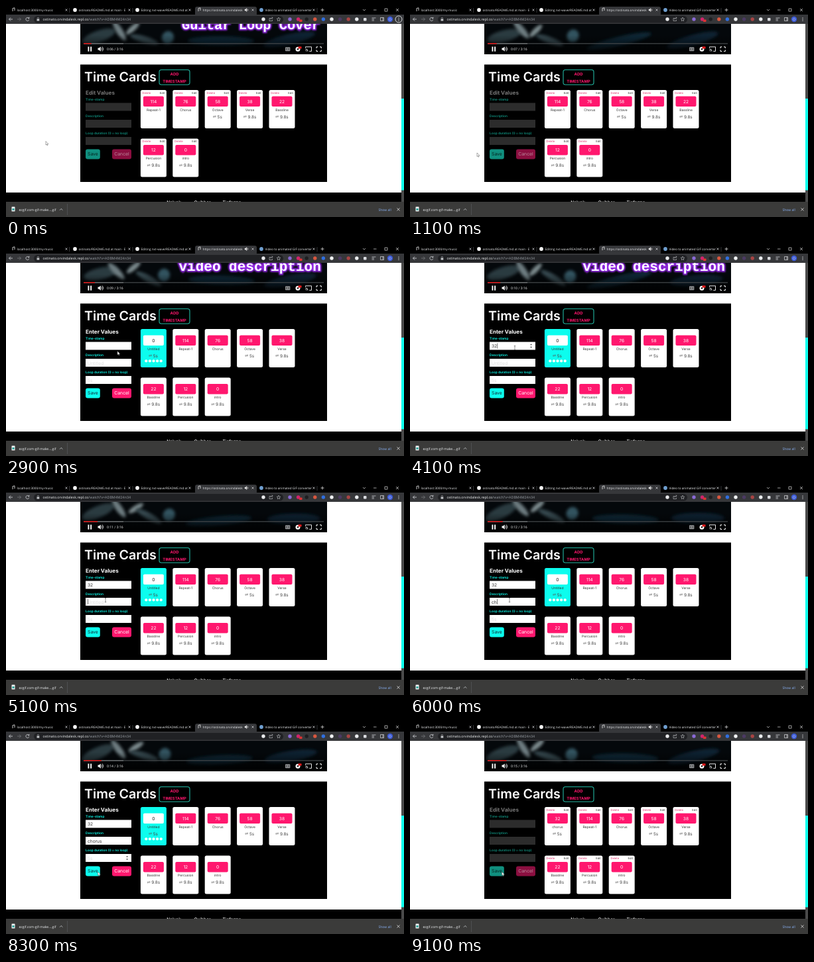
An HTML page that plays this animation: 600x319 px, repeating every 9.2 s.

```html
<!DOCTYPE html>
<html lang="en">
<head>
<meta charset="utf-8">
<title>Time Cards</title>
<style>
html, body { margin: 0; width: 100%; height: 100%; overflow: hidden; background: #fff; }
svg { display: block; width: 100vw; height: 100vh; }
text { font-family: Inter, "Open Sans", sans-serif; text-rendering: geometricPrecision; white-space: pre; }
.ui text { font-family: "Open Sans", "Noto Sans", sans-serif; }
.caption text { font-family: "Liberation Mono", monospace; font-weight: 700; }
</style>
</head>
<body>
<svg id="stage" viewBox="0 0 600 319" preserveAspectRatio="none"></svg>
<script>
const LOOP = 9200, STEP = 100;
const ADD = 2300, SAVE = 8900;
const CYAN = '#0cfdee', PINK = '#ff176e';
const stage = document.getElementById('stage');

function el(parent, tag, attrs = {}, text) {
  const node = document.createElementNS('http://www.w3.org/2000/svg', tag);
  for (const key in attrs) node.setAttribute(key, attrs[key]);
  if (text !== undefined) node.textContent = text;
  parent.append(node);
  return node;
}
const group = (p, attrs) => el(p, 'g', attrs);
const box = (p, x, y, width, height, fill, rx = 0, more = {}) =>
  el(p, 'rect', { x, y, width, height, fill, rx, ...more });
const dot = (p, cx, cy, r, fill) => el(p, 'circle', { cx, cy, r, fill });
const line = (p, d, stroke, w = 0.8, fill = 'none') =>
  el(p, 'path', { d, stroke, 'stroke-width': w, fill });
const label = (p, x, y, size, text, fill, more = {}) =>
  el(p, 'text', { x, y, 'font-size': size, fill, ...more }, text);
const MID = { 'text-anchor': 'middle' }, END = { 'text-anchor': 'end' };
const SEMI = { 'font-weight': 600 }, BOLD = { 'font-weight': 700 };
const show = (node, on) => { node.style.display = on ? '' : 'none'; };
const cross = (p, x, y, r, color) =>
  line(p, `M${x - r} ${y - r}L${x + r} ${y + r}M${x + r} ${y - r}L${x - r} ${y + r}`, color, 0.7);

// ---------- browser frame ----------
function drawBrowser() {
  const ui = group(stage, { class: 'ui' });
  box(ui, 0, 0, 600, 14, '#000');
  box(ui, 285, 1, 93, 14, '#36373a', 3);
  box(ui, 0, 13, 600, 14, '#36373a');

  const tabs = [
    [11, 'localhost:3000/my-music', 91, '#d8d8d8'],
    [104, 'ostinato/README.md at main · E', 186, '#f2f2f2'],
    [198, 'Editing nxt-wave/README.md at', 277, '#f2f2f2'],
    [291, 'https://ostinato.orvindalesk', 372, '#d8d8d8'],
    [385, 'Video to animated GIF converter', 464, '#6f9fd0'],
  ];
  tabs.forEach(([x, name, close, color], i) => {
    const clip = el(ui, 'clipPath', { id: 'tab' + i });
    box(clip, x, 0, i === 3 ? 66 : close - x - 3, 14, '#000');
    if (i % 3) dot(ui, x, 6, 2.9, color);
    else line(ui, `M${x - 1} 8V3.5l3 -.7V7`, color, 0.9);
    label(ui, x + 5.5, 7.8, 4.7, name, '#eceef0', { 'clip-path': `url(#tab${i})` });
    cross(ui, close, 6, 1.5, '#dadce0');
  });
  line(ui, 'M360 5h1.3l1.7 -1.5v5l-1.7 -1.5h-1.3zM364.3 4.5q1.3 1.5 0 3', '#ddd', 0.5, '#ddd');
  line(ui, 'M95.5 3v7M191 3v7M469 3v7', '#56585c', 0.6);
  line(ui, 'M474.5 6h5M477 3.5v5', '#ddd', 0.8);
  line(ui, 'M538 5l2 2 2 -2M554 6h4.5M571 4h4v4h-4z', '#ddd', 0.7);
  cross(ui, 590, 6, 2, '#ddd');

  line(ui, 'M10 20H4.5M7 17.5L4.5 20 7 22.5', '#dadce0');
  line(ui, 'M17 20h5.5M20 17.5l2.5 2.5 -2.5 2.5', '#77797d');
  line(ui, 'M34.3 18.3a2.5 2.5 0 1 0 .5 2.4M34.9 16.8v2h-2', '#dadce0');
  box(ui, 42, 15, 376, 10.5, '#202124', 5.2);
  box(ui, 46.5, 19.5, 3.8, 3, '#c4c7ca', 0.5);
  line(ui, 'M47.3 19.5v-1a1.1 1.1 0 0 1 2.2 0v1', '#c4c7ca', 0.6);
  const url = label(ui, 55.5, 22, 5.35, '', '#9aa0a6');
  el(url, 'tspan', { fill: '#f1f3f4' }, 'ostinato.orvindalesk.repl.co');
  el(url, 'tspan', {}, '/watch?v=ADBM4M24n34');
  dot(ui, 388, 20, 2.7, '#e9eaec');
  line(ui, 'M399.5 18.5h-2.5v4h4.5v-2M398.7 20.5q.5 -2.5 3.4 -2.6M400.8 16.6l1.4 1.3 -1.4 1.3', '#c8cacd', 0.6);
  line(ui, 'M411 17.2l.8 1.9 2 .2 -1.5 1.4 .4 2 -1.7 -1 -1.7 1 .4 -2 -1.5 -1.4 2 -.2z', '#c8cacd', 0.6);
  ['#8a6ad6', '#d0246c', '#1d1e20', '#d9573f', '#2f6fe0', '#f1f3f4', '#4b3a63', '#a94444', '#eceef0']
    .forEach((color, i) => dot(ui, 428 + i * 12.6, 20, 2.7, color));
  box(ui, 442, 20.5, 4.5, 3.5, '#d33', 0.8);
  box(ui, 539, 18, 4.5, 4.5, '#dadce0', 1);
  line(ui, 'M551.5 18h6M551.5 20h3.5M551.5 22h3.5', '#dadce0', 0.7);
  line(ui, 'M564.5 17.5h5v5h-5zM568 17.5v5', '#dadce0', 0.7);
  dot(ui, 579, 20, 4.2, '#3d5bd6');
  label(ui, 579, 22, 5, 'O', '#fff', MID);
  [17.8, 20, 22.2].forEach(y => dot(ui, 592, y, 0.65, '#dadce0'));

  box(ui, 0, 296, 600, 23, '#3b3b3a');
  box(ui, 8.5, 303.5, 5, 7, '#f1f3f4', 0.6);
  box(ui, 9.5, 306, 3, 3, '#2aa198');
  label(ui, 19.5, 309.6, 5.1, 'ezgif.com-gif-make....gif', '#eceef0');
  line(ui, 'M81 308.7l2.2 -2.2 2.2 2.2', '#cfd1d4');
  line(ui, 'M92.5 299v17', '#5c5e62', 0.6);
  label(ui, 561.5, 309.6, 5, 'Show all', '#8ab4f8');
  cross(ui, 591.5, 307.5, 2, '#fff');
  return ui;
}

// ---------- page ----------
box(stage, 0, 0, 600, 319, '#fff');

const frame = el(stage, 'clipPath', { id: 'frame' });
box(frame, 112, 27, 372, 46, '#000');
const soft = el(stage, 'filter', { id: 'soft', x: '-40%', y: '-40%', width: '180%', height: '180%' });
el(soft, 'feGaussianBlur', { stdDeviation: 2.2 });
const glow = el(stage, 'filter', { id: 'glow', x: '-10%', y: '-50%', width: '120%', height: '200%' });
el(glow, 'feGaussianBlur', { stdDeviation: 1.1 });
const shade = el(stage, 'linearGradient', { id: 'shade', x1: 0, y1: 0, x2: 0, y2: 1 });
el(shade, 'stop', { offset: 0, 'stop-color': '#000', 'stop-opacity': 0 });
el(shade, 'stop', { offset: 1, 'stop-color': '#000', 'stop-opacity': 0.9 });

const video = group(stage, { 'clip-path': 'url(#frame)' });
box(video, 112, 27, 372, 46, '#04080b');
// x, y, rx, ry, tilt, colour, sway
const blobs = [
  [140, 44, 26, 9, -20, '#2a3a40', 3],
  [168, 38, 17, 5, 50, '#6d7c80', 3],
  [192, 36, 13, 4, -40, '#7d8b8e', 4],
  [212, 50, 22, 5, 24, '#34474e', 4],
  [242, 46, 9, 10, 15, '#31525f', 4],
  [320, 54, 50, 7, -6, '#0d2834', 5],
  [430, 52, 40, 8, -8, '#0c2430', 4],
].map(([x, y, rx, ry, tilt, fill, sway]) => ({
  x, y, tilt, sway,
  node: el(video, 'ellipse', { rx, ry, fill, filter: 'url(#soft)' }),
}));

function caption(x, y, size, text) {
  const g = group(video, { class: 'caption' });
  label(g, x, y, size, text, '#9a2be8', { stroke: '#9a2be8', 'stroke-width': 3.6, filter: 'url(#glow)' });
  label(g, x, y, size, text, '#fff', { stroke: '#8a2be0', 'stroke-width': 1.6, 'paint-order': 'stroke' });
  return g;
}
const title = caption(265, 34.5, 20.4, 'Guitar Loop Cover');
const about = caption(260.5, 38.5, 21, 'video description');

box(video, 112, 44, 372, 29, 'url(#shade)');
box(video, 117, 56.2, 362, 1.2, '#45494b');
box(video, 117, 56.2, 60, 1.2, '#75797b');
const played = box(video, 117, 56.2, 10, 1.2, '#f00');
box(video, 123.5, 61.5, 1.9, 7.2, '#fff');
box(video, 127.2, 61.5, 1.9, 7.2, '#fff');
line(video, 'M138.5 63.6h1.8l2.4 -2.2v7.4l-2.4 -2.2h-1.8z', 'none', 0, '#fff');
line(video, 'M144 63q1.8 2 0 4M145 61.5q3.2 3.6 0 7', '#fff', 0.8);
const clock = label(video, 152, 67, 5.2, '', '#e4e4e4', { style: 'font-family:Roboto,sans-serif' });
box(video, 421, 62.2, 7.4, 6, '#8d8f91', 0.8);
line(video, 'M424 64.3h-1.4v1.8h1.4M427.2 64.3h-1.4v1.8h1.4', '#222', 0.6);
dot(video, 440, 65.2, 3.5, '#fff');
dot(video, 440, 65.2, 1.2, '#111');
box(video, 440.6, 61.3, 5, 3.2, '#e01818', 0.6);
line(video, 'M451.5 63.5v-1.7h9v6.6h-3.3M451.5 65q3.5 0 3.5 3.5M451.5 67q1.5 0 1.5 1.5', '#fff', 0.9);
line(video, 'M468 64v-2.2h2.3M473 61.8h2.3V64M475.3 66.3v2.2H473M470.3 68.5H468v-2.2', '#fff', 1);

box(stage, 112, 88.5, 372, 177.5, '#000');
label(stage, 118, 114, 19.7, 'Time Cards', '#fff', SEMI);
box(stage, 231, 96.5, 46, 22.5, 'none', 3.2, { stroke: '#22b7a2', 'stroke-width': 1.1 });
label(stage, 254, 105.2, 5.9, 'ADD', PINK, { ...MID, ...BOLD });
label(stage, 254, 115.6, 5.9, 'TIMESTAMP', PINK, { ...MID, ...BOLD });

// ---------- form ----------
const FIELDS = [146.5, 172, 198];
function drawForm(active) {
  const g = group(stage);
  const teal = active ? CYAN : '#10907f';
  label(g, 120, 134, 8.1, active ? 'Enter Values' : 'Edit Values', active ? '#fff' : '#777', BOLD);
  ['Time-stamp', 'Description', 'Loop duration (0 = no loop)'].forEach((text, i) => {
    label(g, 120, FIELDS[i] - 4, 4.85, text, teal, SEMI);
    box(g, 120, FIELDS[i], 69, 12, active ? '#fff' : '#2c2c2c');
  });
  box(g, 120, 216.5, 21.8, 15, teal, 3);
  label(g, 130.9, 226.4, 6.8, 'Save', active ? '#123' : '#03211d', MID);
  box(g, 160, 216.5, 29, 15, active ? PINK : '#8b0f40', 3);
  label(g, 174.5, 226.4, 6.9, 'Cancel', active ? '#fff' : '#b98a9c', MID);
  return g;
}
const idleForm = drawForm(false);
const liveForm = drawForm(true);
const inputs = FIELDS.map(y => label(liveForm, 123, y + 8.6, 6.6, '', '#333'));
const caret = box(liveForm, 0, 0, 0.6, 8, '#222');
const spinners = FIELDS.map(y =>
  line(liveForm, `M181 ${y + 4.8}l1.6 -2 1.6 2zM181 ${y + 7.2}l1.6 2 1.6 -2z`, 'none', 0, '#555'));

// ---------- cards ----------
const oldCards = [
  [114, 'Repeat-1'], [76, 'Chorus'], [58, 'Octave', '5s'], [38, 'Verse', '9.8s'],
  [22, 'Bassline', '9.8s'], [12, 'Percusion', '9.8s'], [0, 'intro', '9.8s'],
];
function drawCards(cards, editing) {
  const g = group(stage);
  cards.forEach(([time, name, loop], i) => {
    const fresh = editing && i === 0;
    const x = 202.9 + (i % 5) * 48.4, y = i < 5 ? 127 : 200.5, mid = x + 19.5;
    box(g, x, y, 39, 58, fresh ? CYAN : '#fff', 2.5);
    if (!editing) {
      label(g, x + 2.7, y + 5.8, 4.2, 'Delete', '#e0336f');
      label(g, x + 36.3, y + 5.8, 4.2, 'Edit', '#333', END);
    }
    box(g, x + 4, y + 9.5, 31, 15.5, fresh ? '#fff' : PINK, 2);
    label(g, mid, y + 19.7, 6.7, time, fresh ? '#222' : '#fff', MID);
    label(g, mid, y + 31.7, 5, name, '#333', MID);
    if (loop) {
      const left = mid - (loop.length > 2 ? 9.5 : 7), mark = y + 40.2;
      line(g, `M${left} ${mark - 0.6}h4.4l-1.1 -.9M${left + 4.4} ${mark + 0.6}h-4.4l1.1 .9`, '#555', 0.5);
      label(g, left + 6.4, y + 42.5, 6.4, loop, '#444');
    }
    if (fresh) for (let k = 0; k < 5; k++) dot(g, x + 8.4 + k * 5.6, y + 48.3, 2.1, '#fff');
  });
  return g;
}
const before = drawCards(oldCards, false);
const during = drawCards([[0, 'Untitled', '5s'], ...oldCards], true);
const after = drawCards([[32, 'chorus', '5s'], ...oldCards], false);

// ---------- footer ----------
box(stage, 0, 282, 596, 14, '#000');
[[253, 'Nolvek'], [296, 'Quibbar'], [340.5, 'Tieforma']].forEach(([x, name]) =>
  label(stage, x, 299.3, 6.5, name, '#fff', { ...MID, 'font-weight': 500 }));
box(stage, 596, 27, 4, 269, '#4a4a4a');
box(stage, 596, 140, 4, 138.5, CYAN);
const ui = drawBrowser();
const ring = el(ui, 'circle', { cx: 592, cy: 20, r: 5, fill: 'none', stroke: '#e8eaed', 'stroke-width': 0.9 });

// ---------- pointer ----------
const arrow = line(stage, 'M0 0V5.6L1.3 4.5 2.2 6.4 3 6 2.2 4.2H4z', '#444', 0.45, '#fff');
const beam = line(stage, 'M-1.2 -3H1.2M0 -3V3M-1.2 3H1.2', '#444', 0.6);
const route = [
  [0, 60, 204.5], [400, 60, 204.5], [1100, 101, 222], [1900, 250, 107], [2400, 250, 107],
  [2900, 168, 160.5], [3200, 158, 155.5], [4200, 158, 155.5], [4800, 150, 175.5],
  [6800, 150, 175.5], [7200, 156, 204], [7600, 156, 204], [8100, 138.5, 225], [LOOP, 138.5, 225],
];
function pointerAt(t) {
  const i = route.findIndex(p => p[0] > t);
  const [t0, x0, y0] = route[i - 1], [t1, x1, y1] = route[i];
  const k = (t - t0) / (t1 - t0), e = k * k * (3 - 2 * k);
  return [x0 + (x1 - x0) * e, y0 + (y1 - y0) * e];
}

const typed = (word, t, start, gap) =>
  word.slice(0, Math.max(0, Math.floor((t - start) / gap) + 1));

function setInput(i, value, hint) {
  inputs[i].textContent = value || hint;
  inputs[i].setAttribute('fill', value ? '#333' : '#dedede');
}

function render(t) {
  const editing = t >= ADD && t < SAVE;
  show(idleForm, !editing);
  show(liveForm, editing);
  show(before, t < ADD);
  show(during, editing);
  show(after, t >= SAVE);
  show(ring, t < 300);

  const values = [typed('32', t, 3600, 300), typed('chorus', t, 5700, 200), ''];
  ['', 'Untitled', '5s'].forEach((hint, i) => setInput(i, values[i], hint));
  const focus = t < 3300 ? -1 : t < 4900 ? 0 : t < 7300 ? 1 : 2;
  show(caret, editing && focus >= 0 && focus < 2);
  if (editing && focus >= 0) {
    const width = values[focus] ? inputs[focus].getComputedTextLength() : 0;
    caret.setAttribute('x', 123.4 + width);
    caret.setAttribute('y', FIELDS[focus] + 2);
  }

  const [x, y] = pointerAt(t);
  const over = editing && x > 120 && x < 189 ? FIELDS.findIndex(f => y > f && y < f + 12) : -1;
  spinners.forEach((s, i) => show(s, i !== 1 && (i === over || i === focus)));
  show(arrow, over < 0);
  show(beam, over >= 0);
  (over < 0 ? arrow : beam).setAttribute('transform', `translate(${x} ${y})`);

  const sec = 6.3 + t / 1000;
  clock.textContent = `0:${String(Math.floor(sec)).padStart(2, '0')} / 3:16`;
  played.setAttribute('width', sec / 196 * 362);
  show(title, t < 900);
  show(about, t >= 2000 && t < 5000);
  blobs.forEach((b, i) => {
    const p = t / LOOP * Math.PI * 2 * (1 + i % 3) + i * 1.7;
    b.node.setAttribute('transform',
      `translate(${b.x + b.sway * Math.sin(p)} ${b.y + 2 * Math.cos(p)}) rotate(${b.tilt + 8 * Math.sin(p)})`);
  });
}

const start = performance.now();
function tick() {
  const t = (performance.now() - start) % LOOP;
  render(Math.floor(t / STEP) * STEP);
  requestAnimationFrame(tick);
}
tick();
</script>
</body>
</html>
```
